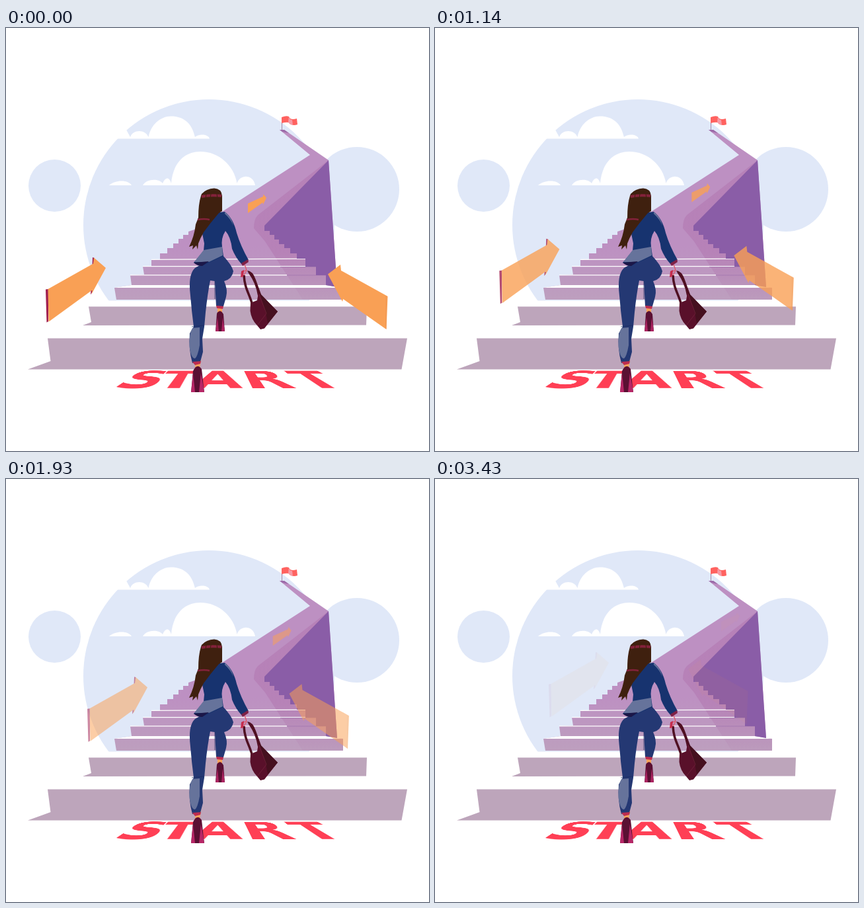
Animation, 640 px wide and 640 px high, one loop 4000 ms. Source, as an HTML page:

```html
<!DOCTYPE html>
<html lang="en">
<head>
<meta charset="utf-8">
<title>Start climbing</title>
<style>
  html, body { margin: 0; width: 100%; height: 100%; overflow: hidden; background: #fff; }
  #stage { position: relative; width: 640px; height: 640px; overflow: hidden; }
  svg { position: absolute; left: 0; top: 0; }
  /* Lays the word on the floor, in perspective */
  #floor {
    position: absolute; left: 0; top: 0; width: 0; height: 0;
    transform-origin: 0 0;
    transform: matrix3d(1, 0, 0, 0, -1.4715, -2.0154, 0, -0.00457, 0, 0, 1, 0, 322, 545, 0, 1);
  }
  #word {
    position: absolute; left: -166px; top: -.846em;
    font: bold 101px/1 "DejaVu Sans", Verdana, sans-serif;
    font-kerning: none; white-space: nowrap; color: #ff3f55;
  }
  .s { margin-right: -10px; }
  .t { margin-right: -7px; }
  .a { margin-right: 5px; }
  .r { margin-right: 12px; }
</style>
</head>
<body>
<div id="stage">
  <svg width="640" height="640" viewBox="0 0 640 640">
    <defs>
      <linearGradient id="stone" gradientUnits="userSpaceOnUse" x1="0" y1="330" x2="0" y2="412">
        <stop offset="0" stop-color="#bd90c2"/>
        <stop offset="1" stop-color="#bd9fbe"/>
      </linearGradient>
      <linearGradient id="shade" gradientUnits="userSpaceOnUse" x1="0" y1="340" x2="0" y2="411">
        <stop offset="0" stop-color="#a860a0" stop-opacity=".3"/>
        <stop offset="1" stop-color="#a860a0" stop-opacity=".06"/>
      </linearGradient>
    </defs>

    <g fill="#e0e8f8">
      <circle cx="307" cy="298" r="190"/>
      <circle cx="73.500" cy="238.500" r="39.500"/>
      <circle cx="531" cy="244" r="64"/>
    </g>
    <g fill="#fff">
      <path d="M110 412.500H520V500H110Z"/>
      <path d="M150 167.500H308C306 160 291 160 286 165C281 143 268 133.500 250 133.500C233 133.500 219 147 215.500 165C211 153 192 153 188 165L182 154H150Z"/>
      <path d="M156 238C165 230 184 229 190 238ZM207 238C212 228 231 227 237 235C241 225 247 225 250 235C252 207 268 187 294 187C322 187 345 208 349.500 235C354 221 374 221 377 238Z"/>
    </g>

    <path fill="url(#stone)" d="M414 154L460 192L285 305L276 308V313H268V319H261V326H253V333H244V341H233V350H220V361H207L209 373L188 374L190 389L164 393L167 411H510V393L501 392L488 200L421 154Z"/>
    <path fill="url(#shade)" d="M488 200L381 283Q375 289 375 303L392 323L449 411H510V393L484 389Z"/>
    <path fill="#9c6ba9" d="M414 154H421L428 159L418 157Z"/>
    <path fill="#fff" d="M220 349.800L453 348.500V349.800L220 351ZM207 360H453V361.300H207ZM188 373.300H425V374.500H188ZM190 389H484L510 393H163Z"/>
    <path fill="none" stroke="#a67bb0" d="M415 361.500H469M425 374H484"/>
    <path fill="#8a5da7" d="M488 200L391 299V307H399V313H406V320H413V327H421V333H430V341H440V349H453V361H469V374H484V389L501 392Z"/>
    <path fill="#bda5bb" d="M125 421.500H546L545 449.500L116 450L129 445ZM63 469.500H607L598.500 516.500H33L67.500 504Z"/>

    <path stroke="#a58ba8" d="M417.500 135V154"/>
    <path fill="#ff625f" d="M417 135Q424 132 428 134Q430 140 440 137L441 146Q433 149 428 143Q424 142 417 144Z"/>
    <path fill="#f79aa5" d="M428 134Q429 139 433 139L434 147Q428 146 427 142Z"/>
  </svg>

  <div id="floor"><div id="word"><span class="s">S</span><span class="t">T</span><span class="a">A</span><span class="r">R</span><span>T</span></div></div>

  <svg width="640" height="640" viewBox="0 0 640 640">
    <g id="bag">
      <path fill="none" stroke="#4f1022" stroke-width="3.500" d="M360 374C361 393 367 400 372 416"/>
      <path fill="#4f1022" d="M365 367Q373 367 378 381Q382 392 386 403L381 405Q378 386 367 371Z"/>
      <path fill="#59102a" d="M382 400L411 429L391 454.500L385 456L380 450Q371 441 369.500 428L370 416L380 412Z"/>
      <path fill="#45101f" d="M383 400L411 429L396 447L393 431Z"/>
      <path fill="none" stroke="#7c2a42" stroke-width=".6" d="M383 403L394 432L380 450"/>
    </g>
    <path fill="none" stroke="#e05668" stroke-width="1.300" d="M361 358L364 366L358 369L357 377M364 367L360 374"/>
    <path fill="#c52c4c" d="M356 368L360 366L359 376L355 377Z"/>

    <g id="legs">
      <path fill="#f6a35a" d="M320 422H327V431H320ZM287 502H295L293 515H286Z"/>
      <path fill="#243873" d="M328 344Q342 359 344 368Q342 380 330 383Q336 396 333 407L329 421H318L316 383L309 382Q305 402 302 430L300 452L297 470L298 490L294 505L282 507Q276 486 278 462L284 452Q281 430 279 405Q275 373 286 363L309 350Z"/>
      <path fill="#66739b" d="M293 453V480Q290 497 286 500Q280 500 277.500 482Q277 462 282 454Z"/>
      <path fill="none" stroke="#1b2a61" stroke-width=".7" d="M316 383V410M281 452L299 450"/>
      <path fill="#bd2d50" d="M318 420L329 421L328 425L319 424ZM282 505L295 504L294 508L286 510Z"/>
    </g>

    <g id="shoes">
      <path fill="#5a1033" d="M319 432Q324 424 329 433L331 459H317Z"/>
      <path fill="#ad2462" d="M320 438L322 459H317ZM328 438L331 459H326Z"/>
      <path fill="#5a1033" d="M283 519Q289 506 296 516L300 551H280Z"/>
      <path fill="#b72767" d="M283 522L286 551H280ZM295 522L300 551H292Z"/>
    </g>

    <g id="jacket">
      <path fill="#17336f" d="M314 280L331 278Q344 288 349 310Q355 330 367 351L357 358Q347 347 342 334Q340 316 332 307Q325 318 327 331L329 345L309 354L296 360L284 355L299 337L300 326L297 311Z"/>
      <path fill="#66739b" d="M299 336L327 331L328 344L307 354L285 354ZM331 278Q341 286 344 299Q340 289 331 281Z"/>
      <path fill="#1b1748" d="M284 355L307 353L297 360Q289 360 284 355Z"/>
      <path fill="#7e2146" d="M356 356L366 350L367 354L358 360Z"/>
    </g>

    <g id="hair">
      <path fill="#3f200f" d="M315 242.500Q326 243 327 254V277L322 280Q309 295 299 309Q294 318 291 326L290 335L288 329L282 335L283 329L277 331Q285 315 287 297L291 287Q291 264 296 251Q303 243 315 242.500Z"/>
      <path fill="none" stroke="#83223a" stroke-width="4" d="M296 255Q310 252 326 254"/>
      <path fill="none" stroke="#83223a" stroke-width="2.500" d="M290 290Q300 288 308 290"/>
      <path fill="none" stroke="#3f200f" d="M303 251L302 258M310 251L309 258M319 251L320 258"/>
    </g>

    <g id="left">
      <path fill="#a12050" d="M60 395.500L64 395V444L61.500 445.500ZM131 347L134 348L132 359H130.500ZM128 403.500L128.500 397H132Z"/>
      <path fill="#f9a055" d="M63.500 395L132 356.500L133 347.500L151 363L129.500 402.500L130.500 396.500L64.500 444.500Z"/>
    </g>
    <g id="right">
      <path fill="#f9a055" d="M487 372.500L506 358L507 367L577.500 406L575.500 456L510 410L509 414Z"/>
      <path fill="none" stroke="#e99254" stroke-width=".7" d="M575 405V455"/>
    </g>
    <path id="far" fill="#f9a055" d="M366 265.500L389 255L389.500 251.500L394 257L389 267L388.500 264L366 280Z"/>
  </svg>
</div>
<script>
  const LOOP = 4000, FPS = 14, LAST = 48;
  // Total drift of each arrow, in px
  const arrows = [["left", 112, -85], ["right", -104, -85], ["far", 67, -49.5]]
    .map(([id, dx, dy]) => ({ el: document.getElementById(id), dx, dy }));

  function draw(t) {
    const step = Math.min(LAST, Math.floor((t + 9) * FPS / 1000));
    const k = step / LAST;
    const p = step * 1000 / FPS / LOOP;
    const alpha = 1 - p * p * (3 - 2 * p);
    for (const { el, dx, dy } of arrows) {
      el.setAttribute("transform", `translate(${dx * k} ${dy * k})`);
      el.setAttribute("opacity", alpha);
    }
  }

  const start = performance.now();
  function tick() {
    draw((performance.now() - start) % LOOP);
    requestAnimationFrame(tick);
  }
  tick();
</script>
</body>
</html>
```
